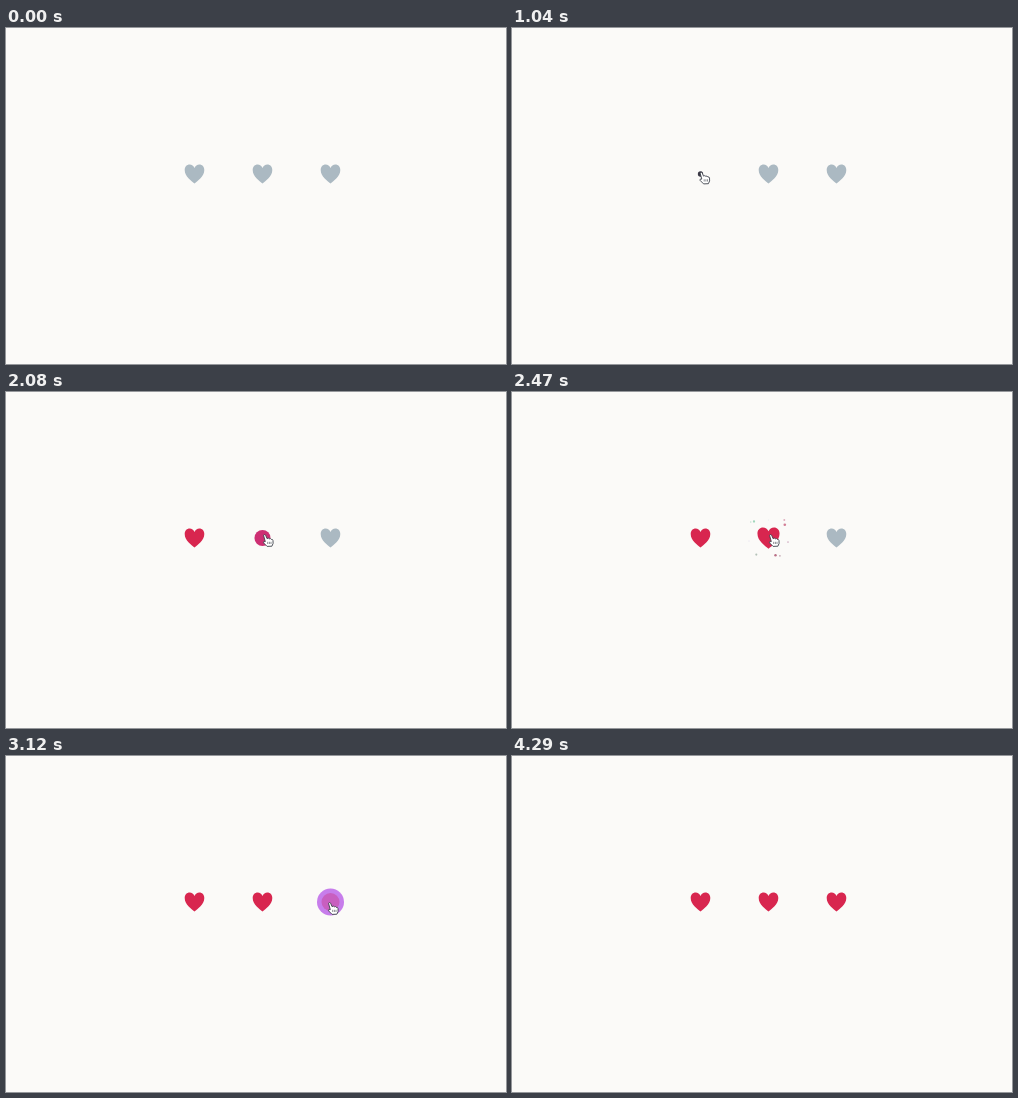
An HTML page with a canvas that plays this animation: 500 by 336 pixels, repeating every 4420 ms.

```html
<!DOCTYPE html>
<html lang="en">
<head>
<meta charset="utf-8">
<title>Three hearts</title>
<style>
html, body { margin: 0; width: 100%; height: 100%; overflow: hidden; background: #fbfaf8; }
canvas { display: block; width: 500px; height: 336px; }
</style>
</head>
<body>
<canvas id="stage" width="500" height="336"></canvas>
<script>
const ctx = document.getElementById('stage').getContext('2d');
const LOOP = 4420, STEP = 130, Y = 146;
const GREY = '#abb9c2', RED = '#d8264f';
const hearts = [
  { x: 188.5, click: 1035 },
  { x: 256.5, click: 2063 },
  { x: 324.5, click: 2985 }
];

// offset x, offset y, final size, colour
const sparks = [
  [-14.5, -16.5, 1.3, '#8ccfae'], [-17.8, -16, 0.9, '#b5dcc8'],
  [16.3, -13.3, 1.5, '#c9607f'], [15.8, -18, 1.1, '#d99ab0'],
  [19.5, 4, 1, '#c9a0b8'], [7, 17.2, 1.4, '#a9506c'],
  [11.4, 17.8, 1, '#b99aa6'], [-12.2, 16.6, 1.2, '#a3b5a9'],
  [-19.5, 3, 0.6, '#d8cdeb'], [0, -18, 0.5, '#cfe0ee']
];

// time, x, y of the hand's upper left corner
const route = [
  [260, 262, 340], [780, 187, 143.5], [1560, 187, 143.5],
  [1950, 256.5, 142], [2470, 256.5, 142], [2860, 322.5, 146.5],
  [2990, 321.5, 146], [3120, 321.5, 146], [3380, 458, 350]
];

const clamp = v => Math.max(0, Math.min(1, v));
const mix = (a, b, k) => a + (b - a) * k;
const rgb = (a, b, k) => 'rgb(' + a.map((v, i) => Math.round(mix(v, b[i], k))) + ')';

// cubic-bezier(.17, .89, .32, 1.49)
function spring(x) {
  if (x <= 0) return 0;
  if (x >= 1) return 1;
  const curve = (s, a, b) => 3 * s * (1 - s) * ((1 - s) * a + s * b) + s * s * s;
  let lo = 0, hi = 1;
  for (let i = 0; i < 24; i++) {
    const mid = (lo + hi) / 2;
    if (curve(mid, .17, .32) < x) lo = mid; else hi = mid;
  }
  return curve(lo, .89, 1.49);
}

function disc(x, y, r, color) {
  ctx.fillStyle = color;
  ctx.beginPath();
  ctx.arc(x, y, Math.max(0, r), 0, Math.PI * 2);
  ctx.fill();
}

function heart(x, scale, color) {
  ctx.save();
  ctx.translate(x, Y);
  ctx.scale(scale, scale);
  ctx.beginPath();
  ctx.moveTo(0, 9.5);
  ctx.bezierCurveTo(-3, 7, -9.8, 2.8, -9.8, -3.9);
  ctx.bezierCurveTo(-9.8, -7.3, -7.6, -9.4, -4.9, -9.4);
  ctx.bezierCurveTo(-2.7, -9.4, -0.9, -8.2, 0, -6);
  ctx.bezierCurveTo(0.9, -8.2, 2.7, -9.4, 4.9, -9.4);
  ctx.bezierCurveTo(7.6, -9.4, 9.8, -7.3, 9.8, -3.9);
  ctx.bezierCurveTo(9.8, 2.8, 3, 7, 0, 9.5);
  ctx.fillStyle = color;
  ctx.fill();
  ctx.restore();
}

function bubble(x, age) {
  const dark = [58, 56, 70], pink = [205, 47, 115], purple = [199, 125, 235];
  const color = age < 17 ? rgb(dark, pink, clamp((age - 5) / 12))
                         : rgb(pink, purple, clamp((age - 17) / 80));
  const r = 13.5 * spring(age / 130);
  const hole = 13.5 * clamp(spring((age - 138) / 120));
  if (hole > 0) {
    if (hole >= r) return;
    ctx.strokeStyle = color;
    ctx.lineWidth = r - hole;
    ctx.beginPath();
    ctx.arc(x, Y, (r + hole) / 2, 0, Math.PI * 2);
    ctx.stroke();
    return;
  }
  disc(x, Y, r, color);
  if (age > 40) disc(x, Y, 9, '#c85fbf');
}

function burst(x, age) {
  const p = (age - 200) / 400;
  if (p <= 0 || p >= 1) return;
  const reach = mix(0.72, 1, clamp(p / 0.45));
  ctx.globalAlpha = clamp((1 - p) * 1.7);
  for (const [dx, dy, size, color] of sparks)
    disc(x + dx * reach, Y + dy * reach, size * (1 - p) * 1.8, color);
  ctx.globalAlpha = 1;
}

function hand(x, y) {
  ctx.save();
  ctx.translate(x, y);
  ctx.beginPath();
  ctx.moveTo(1, 1.3);
  ctx.quadraticCurveTo(2.2, 0, 3.2, 1.3);
  ctx.lineTo(4.5, 4.6);
  ctx.quadraticCurveTo(6, 3.5, 6.8, 4.8);
  ctx.quadraticCurveTo(8.2, 4, 8.8, 5.4);
  ctx.quadraticCurveTo(10.2, 5, 10.5, 6.6);
  ctx.lineTo(10.6, 9.4);
  ctx.lineTo(9.4, 12.2);
  ctx.lineTo(4.6, 12.4);
  ctx.lineTo(1, 8.8);
  ctx.quadraticCurveTo(0.5, 7.1, 2.8, 7.6);
  ctx.closePath();
  ctx.fillStyle = '#fff';
  ctx.fill();
  ctx.strokeStyle = '#3f434c';
  ctx.lineWidth = 0.9;
  ctx.lineJoin = 'round';
  ctx.stroke();
  ctx.beginPath();
  for (const gx of [5.2, 6.9, 8.5]) {
    ctx.moveTo(gx, 7.8);
    ctx.lineTo(gx, 10);
  }
  ctx.lineWidth = 0.6;
  ctx.stroke();
  ctx.restore();
}

function cursor(t) {
  for (let i = 1; i < route.length; i++) {
    const [t0, x0, y0] = route[i - 1], [t1, x1, y1] = route[i];
    if (t >= t0 && t < t1) {
      const k = (t - t0) / (t1 - t0), e = k * k * (3 - 2 * k);
      hand(mix(x0, x1, e), mix(y0, y1, e));
      return;
    }
  }
}

function draw(t) {
  ctx.fillStyle = '#fbfaf8';
  ctx.fillRect(0, 0, 500, 336);
  for (const { x, click } of hearts) {
    const age = t - click;
    if (age < 0) {
      heart(x, 1, GREY);
      continue;
    }
    bubble(x, age);
    burst(x, age);
    if (age > 175) heart(x, spring((age - 175) / 550), RED);
  }
  cursor(t);
}

let start;
function tick(now) {
  if (start === undefined) start = now;
  const t = (now - start) % LOOP;
  draw(Math.floor(t / STEP + 1e-6) * STEP);
  requestAnimationFrame(tick);
}
draw(0);
requestAnimationFrame(tick);
</script>
</body>
</html>
```
